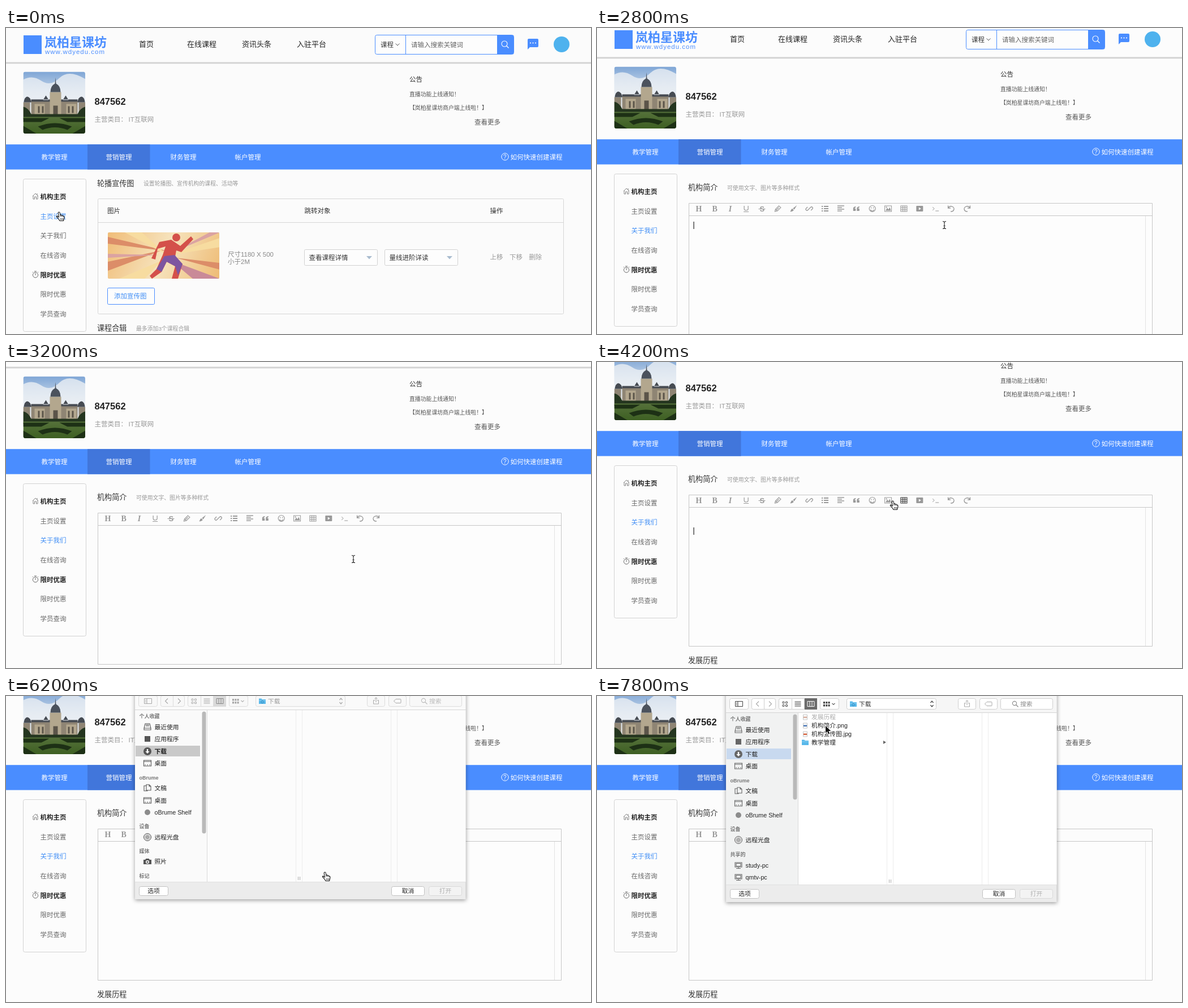
These frames come from a looping animation (1034x542 px, 8 s). An HTML page with a canvas:

```html
<!DOCTYPE html>
<html lang="zh">
<head>
<meta charset="utf-8">
<style>
html, body { margin: 0; width: 100%; height: 100%; overflow: hidden; background: #fbfbfb; }
canvas { display: block; }
</style>
</head>
<body>
<canvas id="stage" width="1034" height="542"></canvas>
<script>
const g = document.getElementById('stage').getContext('2d');
const SANS = '"Liberation Sans","Noto Sans CJK SC","Noto Sans CJK JP","Noto Sans CJK",sans-serif';
const SERIF = '"Liberation Serif",serif';
const BLUE = '#4a8dff', LOOP = 8000, STEP = 200;

// --- drawing helpers ---
function text(s, x, cy, size = 11.5, color = '#666', weight = '', family = SANS) {
  g.font = `${weight} ${size}px ${family}`;
  g.fillStyle = color;
  g.fillText(s, x, cy + size * 0.37);
}
function rect(x, y, w, h, color) {
  g.fillStyle = color;
  g.fillRect(x, y, w, h);
}
function box(x, y, w, h, r, fill, stroke) {
  g.beginPath();
  g.roundRect(x + 0.5, y + 0.5, w - 1, h - 1, r);
  if (fill) { g.fillStyle = fill; g.fill(); }
  if (stroke) { g.lineWidth = 1; g.strokeStyle = stroke; g.stroke(); }
}
function path(x, y, d, color, width, flip = 1) {
  const p = new Path2D(d);
  g.save();
  g.translate(x, y);
  g.scale(flip, 1);
  if (width) {
    g.lineWidth = width;
    g.strokeStyle = color;
    g.stroke(p);
  } else {
    g.fillStyle = color;
    g.fill(p, 'evenodd');
  }
  g.restore();
}
function circle(x, y, r, fill, stroke, width = 1) {
  g.beginPath();
  g.arc(x, y, r, 0, 7);
  if (fill) { g.fillStyle = fill; g.fill(); }
  if (stroke) { g.lineWidth = width; g.strokeStyle = stroke; g.stroke(); }
}
function fade(x0, y0, x1, y1, ...colors) {
  const f = g.createLinearGradient(x0, y0, x1, y1);
  colors.forEach((c, i) => f.addColorStop(i / (colors.length - 1), c));
  return f;
}
function clipped(x, y, w, h, r, paint) {
  g.save();
  g.beginPath();
  g.roundRect(x, y, w, h, r);
  g.clip();
  g.translate(x, y);
  paint();
  g.restore();
}
function magnifier(x, y, r, color) {
  circle(x - 1, y - 1, r, null, color, 1.1);
  path(x - 1 + r * 0.7, y - 1 + r * 0.7, 'M0 0l4 4', color, 1.2);
}
// Values of [time, ...values] keys at time t, linear between keys
function at(keys, t) {
  if (t <= keys[0][0]) return keys[0].slice(1);
  for (let i = 1; i < keys.length; i++) {
    const a = keys[i - 1], b = keys[i];
    if (t <= b[0]) {
      const k = (t - a[0]) / (b[0] - a[0]);
      return a.slice(1).map((v, j) => v + (b[j + 1] - v) * k);
    }
  }
  return keys[keys.length - 1].slice(1);
}

// --- motion ---
const POINTER = [
  [0, 94, 326], [400, 93, 334], [800, 90, 354], [1200, 88, 366], [1400, 88, 367],
  [1600, 96, 366], [1800, 230, 358], [2000, 430, 345], [2200, 570, 345], [2400, 614, 349],
  [3600, 614, 349], [3800, 604, 335], [4000, 560, 280], [4200, 523, 246], [4400, 516, 244],
  [4800, 516, 244], [5000, 524, 258], [5200, 545, 290], [5400, 560, 308], [5600, 564, 312],
  [6200, 564, 312], [6600, 560, 306], [6800, 515, 245], [7000, 455, 168], [7200, 420, 122],
  [7400, 406, 94], [7600, 394, 62], [7800, 404, 53]
];
const SCROLL = [[2400, 0], [2600, 2], [2800, 9], [3000, 22], [3200, 52], [3400, 76], [3600, 84]];
const SHEET = [[5600, -400], [5800, -339], [6000, -110], [6200, -5], [6400, 0]];

// --- page ---
function header() {
  rect(0, 60, 1034, 1, '#e4e4e4');
  rect(0, 61, 1034, 2, '#d3d3d3');
  rect(0, 63, 1034, 1, '#efefef');
  rect(31, 13, 32, 33, BLUE);
  text('岚柏星课坊', 68, 25, 22, BLUE, 'bold');
  g.letterSpacing = '1px';
  text('www.wdyedu.com', 69, 42, 11.5, BLUE);
  g.letterSpacing = '0px';
  [['首页', 235], ['在线课程', 320], ['资讯头条', 417], ['入驻平台', 514]]
    .forEach(([s, x]) => text(s, x, 28, 13, '#222'));
  box(652, 12, 246, 35, 3, '#fdfdfd', BLUE);
  rect(706, 13, 1, 33, BLUE);
  rect(868, 13, 29, 33, BLUE);
  text('课程', 662, 29.5, 11.5, '#333');
  path(692, 29, 'M-3.5-1.5 0 2 3.5-1.5', '#555', 1);
  text('请输入搜索关键词', 716, 29.5, 11.5, '#666');
  magnifier(882, 29, 5, '#fff');
  path(922, 19, 'M2 0h15q2 0 2 2v11q0 2-2 2h-13l-4 4v-17q0-2 2-2z', BLUE);
  [927, 931.5, 936].forEach(x => circle(x, 26.5, 1.1, '#fff'));
  circle(982, 29, 14, '#4eb2ee');
}
function photo() {
  rect(0, 0, 110, 110, fade(0, 0, 0, 70, '#7fa6d6', '#c3d4e8', '#eceff0'));
  path(0, 0, 'M0 14q16-9 32 2t32-5 46 2v38h-110z', 'rgba(240,243,246,.75)');
  path(0, 0, 'M12 52h86v26h-86zM0 54h14v26h-14zM96 54h14v26h-14z', '#8f8574');
  path(0, 0, 'M14 49h82v4h-82zM1 54q1-9 6-10 6 1 7 10zM96 54q1-9 7-10 5 1 6 10zM35 50l5-8 5 8zM70 50l5-8 5 8z', '#464b52');
  path(0, 0, 'M47 36h20v42h-20zM20 57h18v20h-18zM76 57h18v20h-18z', '#b3a78e');
  path(0, 0, 'M48 36q0-11 8-15l1-11 1 11q8 4 8 15z', '#4b525d');
  path(0, 0, 'M53 60h8v17h-8zM26 61h3v12h-3zM33 61h3v12h-3zM79 61h3v12h-3zM86 61h3v12h-3z', '#5b5449');
  path(0, 0, 'M0 62q9 2 14 13h82q5-11 14-13v22h-110z', '#24351f');
  rect(0, 80, 110, 30, fade(0, 80, 0, 110, '#55713a', '#3d5f22'));
  path(0, 0, 'M0 82h46l-14 7h-32zM64 82h46v7h-32zM26 97q30-12 60 0l-8 6q-22-9-44 0zM0 96l24 14h-24zM110 96l-24 14h24z', '#1d3015');
}
function banner() {
  rect(0, 0, 198, 82, fade(0, 0, 198, 82, '#f0bd78', '#f6e3bd', '#eebb74'));
  path(0, 0, 'M0 52L95 32 0 68zM0 8L110 34 0 20zM198 66L120 45 198 54z', '#dc8d68');
  path(0, 0, 'M30 0L105 40 60 0zM198 10L110 40 198 26zM20 82L95 50 65 82z', '#f7dca0');
  path(0, 0, 'M198 0L115 35 180 0zM0 38L90 40 0 45z', '#dba3a2');
  path(0, 0, 'M150 82L112 50 198 82z', '#c98a98');
  circle(121, 9, 7, '#d4504a');
  path(0, 0, 'M91 17L112 13 128 24 147 7 151 12 130 35 121 32 119 43 132 56 124 82 113 82 119 60 104 52 95 70 78 82 74 77 86 65 97 40 102 25 88 29 84 48 77 46z', '#d4504a');
  path(0, 0, 'M100 42L118 40 132 56 124 76 119 60 104 52 95 70 86 65z', '#7d55a0');
}
function orgAndTabs() {
  clipped(30.5, 77.5, 109.5, 109.5, 4, photo);
  text('847562', 156.5, 130, 16.5, '#222', 'bold');
  text('主营类目：', 156.5, 162, 11.5, '#999');
  text('IT互联网', 216.5, 162, 11.5, '#999');
  text('公告', 713, 90.5, 11.5, '#333');
  text('直播功能上线通知！', 713, 117, 9.85, '#555');
  text('【岚柏星课坊商户端上线啦！】', 713, 141, 9.85, '#555');
  text('查看更多', 828, 167, 11.5, '#555');
  rect(0, 206.2, 1034, 44.4, BLUE);
  rect(144, 206.2, 110.5, 44.4, '#4176db');
  ['教学管理', '营销管理', '财务管理', '帐户管理']
    .forEach((s, i) => text(s, 62.5 + i * 114, 228.5, 11.5, '#fff'));
  circle(882, 228, 6.2, null, '#fff');
  text('?', 879, 228, 10, '#fff');
  text('如何快速创建课程', 891.5, 228.5, 11.5, '#fff');
}
function sideMenu(t, px, py) {
  box(30, 267, 112, 271, 3, '#fcfcfc', '#d2d2d2');
  const hover = px < 142 ? Math.floor((py - 281) / 34.6) : -1;
  if (t >= 1400 && hover === 2) rect(32, 351, 109, 34, '#f4f8ff');
  const current = t < 1400 ? 1 : 2;
  ['机构主页', '主页设置', '关于我们', '在线咨询', '限时优惠', '限时优惠', '学员查询'].forEach((s, i) => {
    const head = i % 4 === 0, lit = !head && (i === current || i === hover);
    text(s, 60.5, 299 + i * 34.6, 11.5, lit ? '#3f8df5' : head ? '#222' : '#666', head ? 'bold' : '');
  });
  path(52, 298, 'M-5 0 0-5 5 0M-4-1v6h2.5v-4h3v4h2.5v-6M3-5v3', '#777', 0.9);
  circle(52, 437.5, 4.6, null, '#666');
  path(52, 437, 'M0-2.5v3.5M-2-6h4M-5-4l1-1M5-4l-1-1', '#666', 1);
}
function select(x, s) {
  box(x, 392, 130, 29, 2, '#fdfdfd', '#d2d2d2');
  text(s, x + 8.5, 406.5, 11.5, '#333');
  path(x + 115, 404, 'M-5 0h10l-5 5.5z', '#a9bccf');
}
function carousel() {
  text('轮播宣传图', 161, 275, 13.1, '#333');
  text('设置轮播图、宣传机构的课程、活动等', 243, 275.5, 9.85, '#999');
  box(162, 302, 824, 205, 2, null, '#d6d6d6');
  rect(162, 344, 824, 1, '#d6d6d6');
  [['图片', 179], ['跳转对象', 527.5], ['操作', 855.5]]
    .forEach(([s, x]) => text(s, x, 324, 11.5, '#333'));
  clipped(180, 362, 197, 82, 2, banner);
  text('尺寸1180 X 500', 392, 401, 11.5, '#888');
  text('小于2M', 392, 413.5, 11.5, '#888');
  select(527, '查看课程详情');
  select(669, '量线进阶详读');
  ['上移', '下移', '删除'].forEach((s, i) => text(s, 855.5 + i * 34.4, 406, 11.5, '#999'));
  box(179, 460, 84, 30, 2, '#fdfdfd', BLUE);
  text('添加宣传图', 191, 475, 11.5, '#3f8df5');
  text('课程合辑', 161, 531, 13.1, '#333');
  text('最多添加3个课程合辑', 230, 532, 9.85, '#999');
}

// Toolbar icons: [path, stroke width (0 = fill), mirror]
const QUOTE = 'M-6 0q0-3.5 4.5-4v1.7q-2 .3-2 2h2v4.3h-4.5z M.5 0q0-3.5 4.5-4v1.7q-2 .3-2 2h2v4.3h-4.5z';
const TURN = 'M-5.5-5.5v4.5h4.5M-5-1.5a5.2 4.6 0 1 1 4 6.5';
const TOOLS = [
  ['M-5 5l1-4 6-6 3.5 3-6 6zM-4 1l3 3M-2 2l4-4', 1.1],
  ['M6-6L1.5 1.5-1-.5zM-2 0L.5 2.5C-1 5-4 5.5-6 5-4 4-5 1-2 0z', 0],
  ['M-1.5 1.5l4-4a2 2 0 0 1 3 3l-2.5 2.5M1.5-1.5l-4 4a2 2 0 0 1-3-3l2.5-2.5', 1.2],
  ['M-2-4h8M-2 0h8M-2 4h8M-6-4h2.2M-6 0h2.2M-6 4h2.2', 1.8],
  ['M-6-5h12M-6-2h8M-6 1h12M-6 4h8', 1.5],
  [QUOTE, 0],
  ['M5.5 0a5.5 5.5 0 1 1-11 0a5.5 5.5 0 1 1 11 0M-3 1.5a3 2.6 0 0 0 6 0M-2-2.5v2M2-2.5v2', 1.2],
  ['M-6.5-5.5h13v11h-13zM-5.5-4.5v9h11v-9zM-4.5 3.5l3-5 2 3 2.5-4 2 6zM-4-3.5h2v2h-2z', 0],
  ['M-5.5-5h11v10h-11zM-5.5-1.7h11M-5.5 1.7h11M-1.8-5v10M1.8-5v10', 1.1],
  ['M-6-4q0-1 1-1h10q1 0 1 1v8q0 1-1 1h-10q-1 0-1-1zM-1.5-2.5v5l4-2.5z', 0],
  ['M-5-3l3 3-3 3M0 4h6', 1],
  [TURN, 1.4],
  [TURN, 1.4, -1]
];
function toolbar(hot) {
  const x = i => 180 + i * 27.88, y = 329, ink = '#999';
  text('H', x(0) - 5.5, y, 14, ink, 'bold', SERIF);
  text('B', x(1) - 4.5, y, 14, ink, 'bold', SERIF);
  text('I', x(2) - 3, y, 14, ink, 'italic bold', SERIF);
  path(x(3), y, 'M-3.5-5v5q0 3 3.5 3t3.5-3v-5M-4.5 5.5h9', ink, 1.2);
  text('S', x(4) - 4, y, 13, ink, 'bold');
  rect(x(4) - 6, y, 12, 1, ink);
  TOOLS.forEach(([d, w, flip], i) => path(x(i + 5), y, d, i + 5 === hot ? '#333' : ink, w, flip));
}
function uploadPanel(hover) {
  g.save();
  g.shadowColor = 'rgba(0,0,0,.25)';
  g.shadowBlur = 3;
  g.shadowOffsetY = 1;
  box(449, 341, 246, 92, 0, '#fff', '#ccc');
  g.restore();
  text('上传图片', 464, 354, 11.5, '#333', 'bold');
  text('网络图片', 523, 354, 11.5, '#999');
  rect(460, 363, 226, 1, '#f1f1f1');
  rect(460, 362, 54, 1.3, '#444');
  path(681, 354, 'M-3-3l6 6M3-3l-6 6', '#777', 2);
  path(571.5, 373, 'M0 0l14 14h-8v14h-12v-14h-8zM-18 23h9v8h18v-8h9l7 15h-50zM-25 41h50v3.5h-50z', hover ? '#333' : '#999');
}
function editor(t, py) {
  text('机构简介', 161, 291, 13.1, '#333');
  text('可使用文字、图片等多种样式', 230, 292, 9.85, '#999');
  box(162, 319, 820, 269, 0, '#fdfdfd', '#c6c6c6');
  rect(163, 320, 818, 21, t < 2600 ? '#f1f1f1' : '#fcfcfc');
  rect(162, 341, 820, 1, '#c6c6c6');
  rect(969, 342, 1, 245, '#e2e2e2');
  toolbar(t === 4200 ? 13 : t > 4200 && t < 5000 ? 12 : -1);
  const typed = t >= 3600, since = t - (typed ? 3800 : 1400);
  if (t < 4800 && Math.floor(since / 500) % 2 === 0) rect(170.5, typed ? 377 : 352, 1.2, 13, '#222');
  text('发展历程', 161, 612, 13.1, '#333');
  if (t >= 4600) uploadPanel(py > 288);
}

// --- file dialog ---
const GLYPH = {
  tray: 'M-6 5h12v-3l-2-8h-8l-2 8zM-6 2h12M-3-4h6M-3-2h6',
  desk: 'M-6.5-5h13v10h-13zM-6.5-3h13M-5 3h2M-1 3h2M3 3h2',
  docs: 'M-2-6h5l3 3v7h-8zM-2-4h-4v9h6v-1M3-6v3h3',
  pc: 'M-6-5h12v8h-12zM-4-3.5h8v5h-8zM-4 5.5h8M0 3v2.5',
  camera: 'M-7-3h3l1.5-2h5l1.5 2h3v8h-14zM3 1a3 3 0 1 0-6 0a3 3 0 1 0 6 0M1.5 1a1.5 1.5 0 1 1-3 0a1.5 1.5 0 1 1 3 0'
};
const PLACES = [
  ['个人收藏', 41], ['最近使用', 60, 'tray'], ['应用程序', 81, 'square'], ['下载', 103, 'down'], ['桌面', 124, 'desk'],
  ['oBrume', 150], ['文稿', 168, 'docs'], ['桌面', 190, 'desk'], ['oBrume Shelf', 211, 'dot'],
  ['设备', 236], ['远程光盘', 255, 'disc']
];
const MEDIA = [['媒体', 280], ['照片', 298, 'camera'], ['标记', 324]];
const SHARED = [['共享的', 281], ['study-pc', 300, 'pc'], ['qmtv-pc', 321, 'pc']];

function glyph(kind, y, ink) {
  const x = 250;
  if (kind === 'square') rect(x - 5, y - 5, 10, 10, ink);
  else if (kind === 'dot') circle(x, y, 5, '#8c8c8c');
  else if (kind === 'disc') {
    circle(x, y, 6.5, '#ddd', ink);
    circle(x, y, 3.6, null, '#999');
    circle(x, y, 1.6, '#fff', ink);
  } else if (kind === 'down') {
    circle(x, y, 7, ink);
    path(x, y, 'M-1.2-4h2.4v4h2.5l-3.7 4-3.7-4h2.5z', '#fff');
  } else path(x, y, GLYPH[kind], ink, kind === 'camera' ? 0 : 1.1);
}
function folder(x, y) {
  path(x, y, 'M-6-4.5h4.5l1 1.5h6.5v8h-12z', '#58b8ea');
  rect(x - 6, y - 1.5, 12, 1, '#8fd3f5');
}
function sheetBar(active) {
  const ink = active ? '#444' : '#a8a8a8', pale = '#a8a8a8', edge = active ? '#cfcfcf' : '#dcdcdc';
  [[234, 34], [273, 43], [321, 68], [394, 34], [441, 159], [638, 32], [676, 32], [713, 93]]
    .forEach(([x, w]) => box(x, 4, w, 20, 3, active ? '#fff' : '#f8f8f8', edge));
  rect(366, 4, 23, 20, active ? '#6a6a6a' : '#dadada');
  [295, 344, 366].forEach(x => rect(x, 4, 1, 20, edge));
  path(251, 14, 'M-6.5-4.5h13v9h-13zM-2-4.5v9M-5-2h1.5M-5 0h1.5M-5 2h1.5', ink, 1);
  path(284, 14, 'M2-4.5l-4.5 4.5 4.5 4.5', pale, 1.1);
  path(306, 14, 'M-2-4.5l4.5 4.5-4.5 4.5', pale, 1.1);
  for (let i = 0; i < 4; i++) box(327.5 + (i % 2) * 5.5, 9.5 + (i >> 1) * 5.5, 4, 4, 0.5, null, ink);
  path(355, 14, 'M-5.5-4h11M-5.5-1.3h11M-5.5 1.3h11M-5.5 4h11', ink, 1);
  path(378, 14, 'M-6-4.5h12v9h-12zM-2-4.5v9M2-4.5v9', active ? '#fff' : '#888', 1);
  for (let i = 0; i < 6; i++) rect(400 + (i % 3) * 4.3, 10 + (i > 2 ? 5 : 0), 3, 3.5, ink);
  path(418, 14, 'M-2.5-1.2l2.5 2.5 2.5-2.5', ink, 1.1);
  folder(453, 14);
  circle(453, 15.5, 2.2, null, '#3b8fc0');
  text('下载', 463, 14, 10.75, active ? '#333' : '#999');
  path(592, 14, 'M-2.5-2l2.5-3 2.5 3M-2.5 2l2.5 3 2.5-3', ink, 1.2);
  path(654, 14, 'M-2-1.5h-2.5v6.5h9v-6.5h-2.5M0 2v-8M-2.5-4l2.5-2.5 2.5 2.5', pale, 1);
  path(692, 14, 'M-3-3.5h8q1 0 1 1v5q0 1-1 1h-8l-3.5-3.5z', pale, 1);
  const hint = active ? '#8a8a8a' : '#bbb';
  magnifier(739, 14, 3.6, hint);
  text('搜索', 748, 14, 10.75, hint);
}
function fileRow(s, y, color, thumb) {
  if (thumb) {
    box(364, y - 5, 8, 10, 0, '#fafafa', '#c4c4c4');
    rect(365, y - 1, 6, 2.5, thumb);
  } else folder(368, y);
  text(s, 379, y, 10.75, color);
}
function dialog(t, dy) {
  const active = t >= 6400;
  g.save();
  g.translate(0, dy);
  g.save();
  g.shadowColor = 'rgba(0,0,0,.38)';
  g.shadowBlur = 7;
  g.shadowOffsetY = 2;
  rect(228, -30, 584.5, 395, '#ececec');
  g.restore();
  rect(228, -30, 584.5, 59, active ? '#f6f6f6' : '#fafafa');
  rect(228, 29, 584.5, 1, '#d4d4d4');
  rect(228, 30, 127, 304, active ? '#f1f2f2' : '#fafafa');
  rect(355, 30, 457.5, 304, active ? '#fff' : '#fcfcfc');
  [355, 512, 523, 680, 691].forEach((x, i) => rect(x, 30, 1, 304, i ? '#ececec' : '#dadada'));
  rect(516, 325, 1, 6, '#aaa');
  rect(519, 325, 1, 6, '#aaa');
  sheetBar(active);

  rect(229, 93, 114, 19, active ? '#c8d9ef' : '#c9c9c9');
  g.save();
  g.beginPath();
  g.rect(228, 30, 127, 304);
  g.clip();
  [...PLACES, ...(active ? SHARED : MEDIA)].forEach(([s, y, kind]) => {
    if (!kind) return text(s, 235.5, y, 9, '#777', 'bold');
    glyph(kind, y, active ? '#666' : '#555');
    text(s, 262.5, y, 10.75, '#222', kind === 'down' && !active ? 'bold' : '');
  });
  g.restore();
  box(346, 32, 8, active ? 152 : 217, 4, '#b9b9b9');

  if (active) {
    fileRow('发展历程', 37.5, '#aaa', '#d8b0a0');
    fileRow('机构简介.png', 52.5, '#222', '#4a78b8');
    fileRow('机构宣传图.jpg', 67.5, '#222', '#d8643f');
    fileRow('教学管理', 82, '#222');
    path(506, 82, 'M0-3l5 3-5 3z', '#666');
  }
  rect(228, 334, 584.5, 1, '#e0e0e0');
  [['选项', 235, 52], ['取消', 681, 59], ['打开', 747, 59]].forEach(([s, x, w], i) => {
    box(x, 342, w, 17, 3, i < 2 ? '#fff' : '#f3f3f3', i < 2 ? '#c2c2c2' : '#d9d9d9');
    text(s, x + w / 2 - 10.75, 350.5, 10.75, i < 2 ? '#222' : '#b0b0b0');
  });
  g.restore();
}

// --- pointer ---
const HAND = 'M-1.8 1.5C-1.8-.5 1-.5 1.2 1.5L2 5.5C3 4.8 4 5 4.5 6 5.5 5.5 6.5 6 7 7 8 6.8 9 7.5 9 9L8.5 12 7.5 15.5H1L-1.5 11.5-4.5 8.5C-5 7-3.5 6.5-2 8L-.8 9z';
const ARROW = 'M0 0v12.5l3-2.7 2 4.7 2.3-1-2-4.5h4z';
function pointer(t, x, y) {
  if (t >= 1800 && t <= 4000) {
    path(x, y, 'M-3-6.5q3 0 3 2v9q0 2-3 2M3-6.5q-3 0-3 2v9q0 2 3 2M-1.5 1.5h3', '#222', 1.1);
  } else if (t < 6400) {
    path(x, y, HAND, '#fff');
    path(x, y, HAND, '#111', 1.1);
    path(x, y, 'M2 5.5v3M4.5 6v2.5M7 7v2M2.5 11v3M4.5 11v3M6.5 11v3', '#111', 0.8);
  } else {
    path(x, y, ARROW, '#fff', 2);
    path(x, y, ARROW, '#111');
  }
}

function draw(t) {
  const [px, py] = at(POINTER, t), [scroll] = at(SCROLL, t), [dy] = at(SHEET, t);
  rect(0, 0, 1034, 542, t < 2600 ? '#fbfbfb' : '#fcfcfc');
  g.save();
  g.translate(0, -Math.round(scroll));
  header();
  orgAndTabs();
  sideMenu(t, px, py);
  if (t < 1400) carousel();
  else editor(t, py);
  g.restore();
  if (t >= 5800) dialog(t, dy);
  pointer(t, px, py);
}

const start = performance.now();
function tick() {
  const t = (performance.now() - start) % LOOP;
  draw(Math.floor(t / STEP) * STEP);
  requestAnimationFrame(tick);
}
tick();
</script>
</body>
</html>
```
